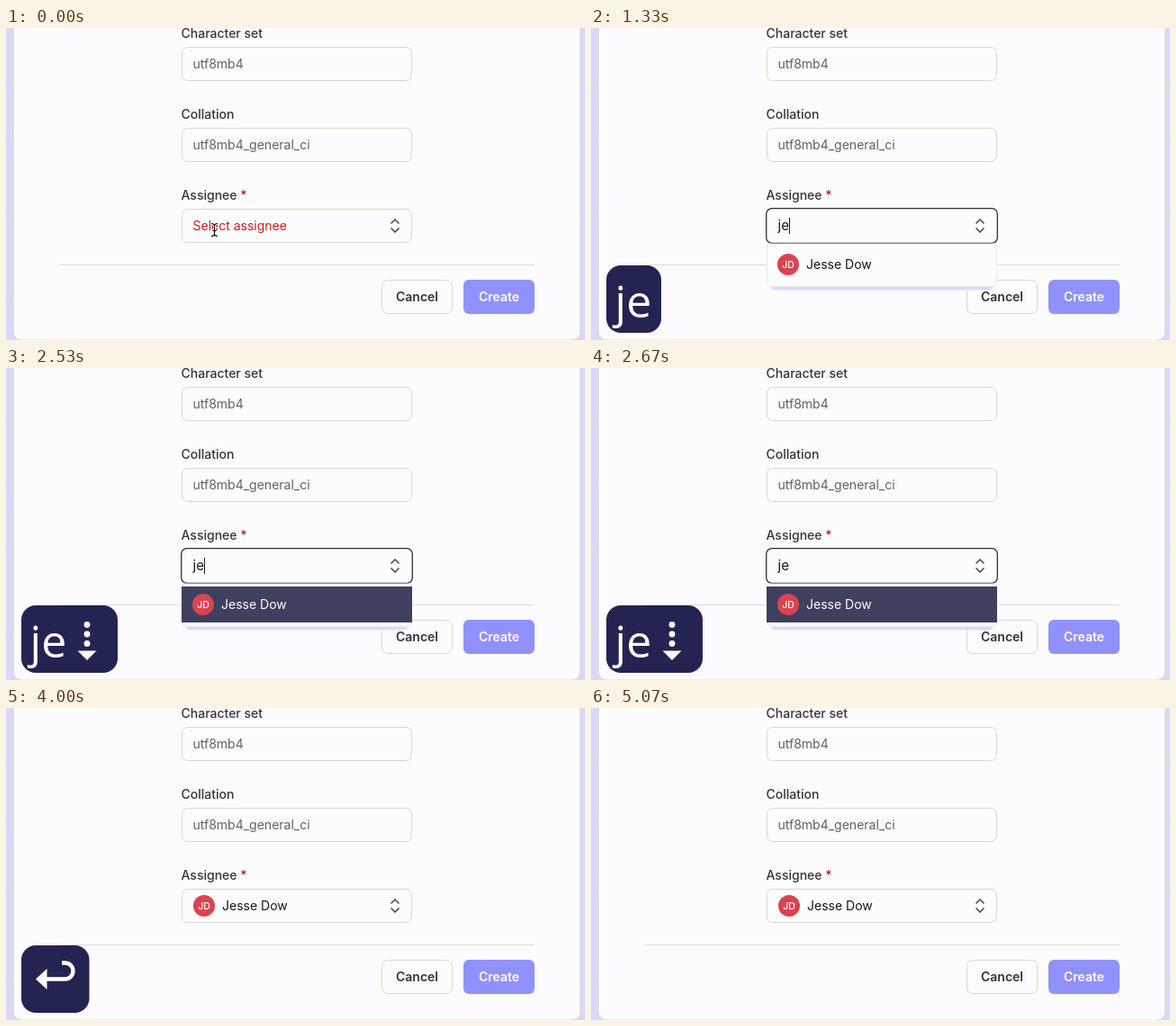
These frames come from a looping animation (643 px wide and 347 px high, 5140 ms). An HTML page:

```html
<!DOCTYPE html>
<html lang="en">
<head>
<meta charset="utf-8">
<title>Assignee picker</title>
<style>
  html, body { margin: 0; width: 100%; height: 100%; overflow: hidden; background: #d8d8fb; }
  svg { display: block; width: 643px; height: 347px; }
  text { font: 400 14px Inter, Roboto, sans-serif; fill: #15151c; }
  .label { font-weight: 500; fill: #33333b; }
  .value { fill: #606066; }
  .box { fill: #fcfcff; stroke: #d9d9cb; }
  .button { font-weight: 600; text-anchor: middle; }
  .initials { font-size: 10.5px; font-weight: 500; fill: #fff; text-anchor: middle; }
  .cap { fill: #242452; }
  .typed { font: 400 50px "Open Sans", "Noto Sans", sans-serif; fill: #fff; }
</style>
</head>
<body>
<svg viewBox="0 0 643 347">
  <rect width="643" height="347" fill="#d8d8fb"/>
  <path d="M0 58.5H643M0 128.5H643M0 202.5H643M0 300.5H643" stroke="#dcdcc4"/>
  <rect x="8.5" y="-20" width="629" height="367" rx="9" fill="#fcfcff" stroke="#e0e0cf"/>

  <text class="label" x="194.5" y="11">Character set</text>
  <rect class="box" x="195.5" y="21.5" width="255" height="37" rx="6"/>
  <text class="value" x="207.5" y="45">utf8mb4</text>

  <text class="label" x="194.5" y="101">Collation</text>
  <rect class="box" x="195.5" y="111.5" width="255" height="37" rx="6"/>
  <text class="value" x="207.5" y="135">utf8mb4_general_ci</text>

  <text class="label" x="194.5" y="191">Assignee <tspan fill="#c8102e">*</tspan></text>
  <rect class="box" x="195.5" y="201.5" width="255" height="37" rx="6"/>
  <rect id="focus" x="194.7" y="200.7" width="256.6" height="38.6" rx="6" fill="#fcfcff" stroke="#303038" stroke-width="1.3"/>
  <path d="M428 217l4-4 4 4M428 223l4 4 4-4" fill="none" stroke="#4c4c52" stroke-width="1.7" stroke-linecap="round" stroke-linejoin="round"/>
  <text id="hint" x="207.5" y="225" fill="#c51f1f" style="fill:#c51f1f">Select assignee</text>
  <text id="query" x="207.5" y="225" style="font-size:15px"></text>
  <path id="caret" d="M0 211V229" stroke="#15151c"/>
  <g id="chosen" transform="translate(220 220)"></g>

  <path d="M59 263.5H587" stroke="#dcdce0"/>
  <rect class="box" x="417.5" y="280.5" width="78" height="37" rx="6"/>
  <text class="button" x="456.5" y="304" style="fill:#33333b">Cancel</text>
  <rect x="508" y="280" width="79" height="38" rx="6" fill="#9191fd"/>
  <text class="button" x="547.5" y="304" style="fill:#fff">Create</text>

  <g id="menu">
    <rect id="shade" x="199" y="250" width="248" rx="6" fill="#dadaff"/>
    <path id="panel" fill="#fcfcff" stroke="#e6e6f6"/>
    <rect id="active" x="195" y="243" width="256" height="40" fill="#3f3f5e"/>
    <g id="first" transform="translate(219 263)"></g>
    <g id="second"></g>
  </g>

  <g id="pointer" fill="none">
    <path id="beam" d="M228 217.5q3 0 3.5 2q.5-2 3.5-2M231.5 219.5V229.5M228 231.5q3 0 3.5-2q.5 2 3.5 2" stroke="#fff" stroke-width="3"/>
    <use href="#beam" style="stroke:#111"/>
    <path d="M228 217.5q3 0 3.5 2q.5-2 3.5-2M231.5 219.5V229.5M228 231.5q3 0 3.5-2q.5 2 3.5 2M229.5 225.5h4" stroke="#111" stroke-width="1.2"/>
  </g>

  <g id="keys">
    <rect id="keysBox" class="cap" x="17" y="264" height="75" rx="16"/>
    <text id="keysText" class="typed" x="26.5" y="322"></text>
    <g id="down" fill="#fff">
      <circle cx="90" cy="285.5" r="3.4"/>
      <circle cx="90" cy="296" r="3.4"/>
      <circle cx="90" cy="306.5" r="3.4"/>
      <path d="M79.5 314.5h21L90 325z"/>
    </g>
  </g>
  <g id="enter">
    <rect class="cap" x="17" y="264" width="75.5" height="75" rx="16"/>
    <path d="M62 283.5h3.5a9 9 0 0 1 0 18H44" fill="none" stroke="#fff" stroke-width="4.4"/>
    <path d="M33 301.5l12.5-11.5v23z" fill="#fff"/>
  </g>
</svg>
<script>
const LOOP = 5140;
const OPEN = 70, KEY_J = 930, KEY_E = 1130, KEY_DOWN = 2130, KEY_ENTER = 3070;
const KEYS_FADE = 3670, ENTER_FADE = 4670, FADE = 260, BLINK = 500;
const owner = { name: "Dana Orwen", initials: "DO", color: "#1fbd66" };
const admin = { name: "Jesse Dow", initials: "JD", color: "#d94450" };

const el = {};
document.querySelectorAll("[id]").forEach(node => el[node.id] = node);

const person = p =>
  `<circle r="12" fill="${p.color}"/><text class="initials" y="3.8">${p.initials}</text>` +
  `<text class="name" x="20" y="5">${p.name}</text>`;
el.chosen.innerHTML = person(admin);
el.first.innerHTML = person(owner);
el.second.innerHTML = person(admin);
const adminName = el.second.querySelector(".name");

const show = (node, on) => node.setAttribute("visibility", on ? "visible" : "hidden");
const fade = (node, value) => node.setAttribute("opacity", value);
const ramp = (t, start, length) => Math.min(1, Math.max(0, (t - start) / length));

function caretOn(t) {
  if (t < KEY_J) return t < 530;
  const last = t < KEY_E ? KEY_J : KEY_E;
  return Math.floor((t - last) / BLINK) % 2 === 0;
}

function draw(t) {
  const open = t >= OPEN && t < KEY_ENTER;
  const typed = t < KEY_J ? "" : t < KEY_E ? "j" : "je";
  const filtered = typed !== "";
  const down = t >= KEY_DOWN;
  const entered = t >= KEY_ENTER;

  show(el.hint, t < OPEN);
  show(el.focus, open);
  show(el.chosen, entered);
  show(el.pointer, !filtered);
  el.query.textContent = open ? typed : "";
  show(el.caret, open && caretOn(t));
  el.caret.setAttribute("transform", `translate(${[208.5, 212.5, 220.5][typed.length]} 0)`);

  // Suggestions
  const bottom = filtered ? 287.5 : 327.5;
  fade(el.menu, open ? ramp(t, OPEN - 60, 180) : 0);
  el.panel.setAttribute("d", `M195.5 240H450.5V${bottom - 6}q0 6-6 6H201.5q-6 0-6-6z`);
  el.shade.setAttribute("height", bottom + 4 - 250);
  fade(el.first, filtered ? 0 : 1);
  el.second.setAttribute("transform", `translate(219 ${filtered ? 263 : 303})`);
  fade(el.active, down ? 1 : 0);
  adminName.style.fill = down ? "#fff" : "";

  // Keystroke caps
  fade(el.keys, filtered ? 1 - ramp(t, KEYS_FADE, FADE) : 0);
  el.keys.setAttribute("transform", `translate(0 ${entered ? -85 : 0})`);
  el.keysText.textContent = typed;
  el.keysBox.setAttribute("width", down ? 107 : typed === "je" ? 61 : 34);
  fade(el.down, down ? 1 : 0);
  fade(el.enter, entered ? 1 - ramp(t, ENTER_FADE, FADE) : 0);
}

const begin = performance.now();
function tick() {
  draw((performance.now() - begin) % LOOP);
  requestAnimationFrame(tick);
}
draw(0);
requestAnimationFrame(tick);
</script>
</body>
</html>
```
